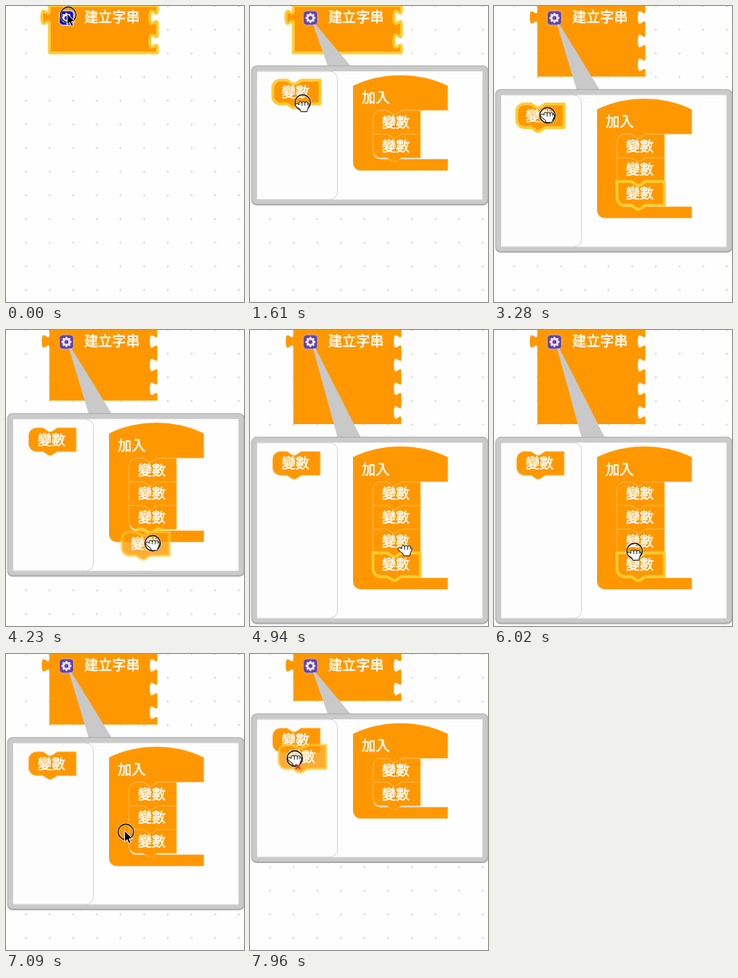
These frames come from a looping animation (298 px wide and 371 px high, 8 s). An HTML page with a canvas:

```html
<!DOCTYPE html>
<html lang="zh-Hant">
<head>
<meta charset="utf-8">
<style>
  html, body { margin: 0; width: 100%; height: 100%; overflow: hidden; background: #fefefe; }
  canvas { display: block; }
</style>
</head>
<body>
<canvas id="stage" width="298" height="371"></canvas>
<script>
const ctx = document.getElementById('stage').getContext('2d');
const LOOP = 8000, OPEN = 500, STEP = 88;
const S = 1.187;          // block units to pixels
const ROW = 25 * S;
const ORANGE = '#ff9800', EDGE = '#ffb74d', YELLOW = '#ffcc33';
const PALETTE_X = 28.5, STACK_X = 154;

// Each action: travel to a block, press, drag it, drop it.
// Adding drags a block out of the palette, otherwise the last one is removed.
const START = { x: 78, y: 11 };
const ACTIONS = [
  { add: true, leave: 1000, arrive: 1350, press: 1610, lift: 1700, drop: 2410,
    at: { x: 66, y: 121 }, to: { x: 183.5, y: 215 }, sway: 40 },
  { add: true, leave: 2500, arrive: 3190, press: 3190, lift: 3460, drop: 4320,
    at: { x: 67, y: 137 }, to: { x: 187, y: 271 }, sway: 0 },
  { add: false, leave: 4850, arrive: 5930, press: 6020, lift: 6110, drop: 6550,
    at: { x: 176, y: 277 }, to: { x: 48, y: 165 }, sway: 42 },
  { add: false, leave: 6730, arrive: 7090, press: 7090, lift: 7360, drop: LOOP,
    at: { x: 150, y: 223 }, to: { x: 56, y: 131 }, sway: 0 }
];

// Eased progress that advances in whole steps
function progress(t, from, to) {
  if (t < from) return 0;
  const steps = Math.round((to - from) / STEP) + 1;
  const u = Math.min(1, (Math.floor((t - from) / STEP + 0.05) + 1) / steps);
  return u * u * (3 - 2 * u);
}

const mix = (a, b, u) => ({ x: a.x + (b.x - a.x) * u, y: a.y + (b.y - a.y) * u });

function sceneAt(t) {
  const index = ACTIONS.findLastIndex(a => t >= a.leave);
  const action = ACTIONS[index];
  const upcoming = ACTIONS.find(a => t < a.drop);
  const finished = ACTIONS.findLast(a => t >= a.drop);

  let n = 2;
  for (const a of ACTIONS) {
    if (t >= (a.add ? a.drop : a.lift)) n += a.add ? 1 : -1;
  }
  const shift = ROW * (n - 2);
  const scene = {
    n, shift, pointer: START, pressed: t < OPEN,
    top: 75 + shift, stackY: 131 + shift, paletteY: 93 + shift,
    lastSelected: Boolean(finished?.add && t < upcoming.lift)
  };
  if (!action) return scene;

  const { add, at, to, press, lift, drop } = action;
  const from = index ? ACTIONS[index - 1].to : START;
  const travel = progress(t, action.leave, action.arrive);
  const p = mix(mix(from, at, travel), to, progress(t, lift, drop - STEP));
  p.x += action.sway * Math.sin(Math.PI * travel);

  scene.pointer = p;
  scene.pressed = t >= press && t < drop + STEP;
  scene.fist = scene.pressed && t >= press + STEP;
  scene.discard = scene.fist && !add && p.x < 110;
  scene.paletteSelected = add && t >= press && t < lift;
  scene.joining = add && t >= drop - 2 * STEP && t < drop;
  if (t >= lift && t < drop) {
    scene.dragged = add
      ? { x: p.x + PALETTE_X - at.x, y: p.y + scene.paletteY - at.y }
      : { x: p.x - 20, y: p.y - 17 };
  }
  return scene;
}

function label(text, x, middle) {
  ctx.font = '17.4px "Noto Sans CJK TC", "Noto Sans CJK", sans-serif';
  ctx.fillStyle = ctx.strokeStyle = '#fff';
  ctx.lineWidth = 0.45;
  ctx.fillText(text, x, middle + 6.4);
  ctx.strokeText(text, x, middle + 6.4);
}

function shape(d, x, y, { fill, stroke, width = 1, scale = S, fillAlpha = 1, strokeAlpha = 1 }) {
  const path = new Path2D(d);
  ctx.save();
  ctx.translate(x, y);
  ctx.scale(scale, scale);
  ctx.lineJoin = 'round';
  if (fill) {
    ctx.globalAlpha = fillAlpha;
    ctx.fillStyle = fill;
    ctx.fill(path);
  }
  if (stroke) {
    ctx.globalAlpha = strokeAlpha;
    ctx.strokeStyle = stroke;
    ctx.lineWidth = width;
    ctx.stroke(path);
  }
  ctx.restore();
}

function disc(x, y, r, color) {
  ctx.fillStyle = color;
  ctx.beginPath();
  ctx.arc(x, y, r, 0, 7);
  ctx.fill();
}

function grid() {
  ctx.fillStyle = '#fefefe';
  ctx.fillRect(0, 0, 298, 371);
  ctx.fillStyle = '#d9d9d9';
  for (let y = 0; y < 371; y += 29.67) {
    for (let x = 25; x < 298; x += 29.6) {
      ctx.fillRect(x - 1.5, y - 0.5, 3, 1);
      ctx.fillRect(x - 0.5, y - 1.5, 1, 3);
    }
  }
}

function gear(hover) {
  const x = 75.7, y = 15;
  const back = hover ? '#0808dc' : '#6346a4', ink = hover ? '#fff' : '#f1e3ec';
  ctx.beginPath();
  ctx.roundRect(x - 9, y - 9, 18, 18, 4.5);
  ctx.fillStyle = back;
  ctx.fill();
  ctx.strokeStyle = hover ? '#fff' : '#cfb0c0';
  ctx.lineWidth = 1;
  ctx.stroke();
  for (let a = 0; a < 2 * Math.PI; a += Math.PI / 4) {
    disc(x + 5 * Math.cos(a), y + 5 * Math.sin(a), 1.4, ink);
  }
  disc(x, y, 5, ink);
  disc(x, y, 2.5, back);
}

function mainBlock(n, selected, hover) {
  let d = 'M 0,0 H 114';
  for (let i = 0; i < n; i++) d += `V ${25 * i + 5} c 0,10 -8,-8 -8,7.5 s 8,-2.5 8,7.5`;
  d += `V ${25 * n} H 0 V 20 c 0,-10 -8,8 -8,-7.5 s 8,2.5 8,-7.5 Z`;
  shape(d, 54.3, -0.6, { fill: ORANGE, stroke: selected && YELLOW, width: 3 });
  gear(hover);
  label('建立字串', 98, 14);
}

function itemBlock(x, y, { selected = false, dragged = false, roundTop = true, roundBottom = true } = {}) {
  const d = (roundTop ? 'M 0,8 A 8,8 0 0,1 8,0' : 'M 0,0') +
    'H 15 l 6,4 3,0 6,-4 H 50 V 25 H 30 l -6,4 -3,0 -6,-4' +
    (roundBottom ? 'H 8 a 8,8 0 0,1 -8,-8' : 'H 0') + 'Z';
  shape(d, x, y, {
    fill: ORANGE, fillAlpha: dragged ? 0.8 : 1,
    stroke: selected ? YELLOW : EDGE, width: selected ? 3 : 0.7, strokeAlpha: dragged ? 0.6 : 1
  });
  label('變數', x + 11.2, y + 14.5);
}

function bubble(top, bottom) {
  const lean = 6 * (top - 75) / ROW;
  ctx.fillStyle = '#c9c9c9';
  ctx.beginPath();
  ctx.moveTo(79, 23);
  ctx.lineTo(98 + lean, top + 2);
  ctx.lineTo(127.5 + lean, top + 2);
  ctx.lineTo(82, 23);
  ctx.fill();

  const box = (inset, radius, color, lift = 0) => {
    ctx.fillStyle = color;
    ctx.beginPath();
    ctx.roundRect(2 + inset, top + inset, 296 - 2 * inset, bottom - top - 2 * inset - lift, radius);
    ctx.fill();
  };
  box(-0.5, 7, '#acacac');
  box(0.5, 6, '#cacaca', 1);
  box(6, 2, '#d0d0d0');
  box(7, 1, '#fefefe');

  const a = top + 7, b = bottom - 7;
  ctx.beginPath();
  ctx.moveTo(9, a);
  ctx.lineTo(100, a);
  ctx.arcTo(109.5, a, 109.5, a + 10, 9.5);
  ctx.lineTo(109.5, b - 9.5);
  ctx.arcTo(109.5, b, 100, b, 9.5);
  ctx.lineTo(9, b);
  ctx.fillStyle = '#fdfdfd';
  ctx.fill();
  ctx.strokeStyle = '#d6d6d6';
  ctx.lineWidth = 1;
  ctx.stroke();
}

function container(y, n) {
  const arm = 26 + 25 * n + 1.6;
  shape(`M 0,0 c 30,-15 70,-15 100,0 V 26 H 51 l -6,4 -3,0 -6,-4 H 29 a 8,8 0 0,0 -8,8
    V ${arm - 8} a 8,8 0 0,0 8,8 H 100 V ${arm + 12} H 8 a 8,8 0 0,1 -8,-8 Z`,
    129, y, { fill: ORANGE });
  label('加入', 140, y + 15);
}

function editor(scene, slack) {
  const { n, shift, top, stackY, dragged } = scene;
  bubble(top, 249.5 + 2 * shift + slack);
  container(100 + shift, n);
  for (let i = 0; i < n; i++) {
    const last = i === n - 1;
    itemBlock(STACK_X, stackY + i * ROW, {
      selected: last && scene.lastSelected, roundTop: i === 0, roundBottom: last
    });
  }
  if (scene.joining) {
    shape('M 8,0 H 15 l 6,4 3,0 6,-4 H 35', STACK_X, stackY + n * ROW, { stroke: YELLOW, width: 3.5 });
  }
  itemBlock(PALETTE_X, scene.paletteY, { selected: scene.paletteSelected });
  if (dragged) itemBlock(dragged.x, dragged.y, { selected: true, dragged: true });
}

function hand(x, y, rise) {
  shape(`M -8,1 C -10,-3 -6,-4 -4,-1 v ${-rise} q 0,-2 2,-2 t 2,2 q 0,-2 2,-2 t 2,2
    q 0,-1.6 2,-1.6 t 1.7,2 q 2.6,0 1.8,3 l -1.8,4 l -1,4 h -8 l -1,-3 Z`,
    x, y, { fill: '#fff', stroke: '#111', scale: 0.95 });
  shape(`M 0,${-1 - rise} v 3.5 M 4,${-1 - rise} v 3.5 M 7.4,-3 v 2.5`, x, y,
    { stroke: '#111', width: 0.9, scale: 0.95 });
}

function isOverBlock({ x, y }, { n, stackY, paletteY }) {
  const inside = (left, top, height) =>
    x >= left && x <= left + 50 * S && y >= top && y <= top + height;
  return inside(STACK_X, stackY, n * ROW) || inside(PALETTE_X, paletteY, ROW);
}

function cursor(scene, open) {
  const { x, y } = scene.pointer;
  if (scene.pressed) {
    ctx.beginPath();
    ctx.arc(x, y, 9.7, 0, 7);
    ctx.strokeStyle = 'rgba(255,255,255,.6)';
    ctx.lineWidth = 2.6;
    ctx.stroke();
    ctx.strokeStyle = '#151515';
    ctx.lineWidth = 1.4;
    ctx.stroke();
  }
  if (scene.fist) {
    hand(x - 0.5, y + 1, 2);
    if (scene.discard) {
      shape('M 0,0 l 6,6 m 0,-6 l -6,6', x + 1, y + 7, { stroke: '#e33022', width: 1.8, scale: 1 });
    }
  } else if (open && isOverBlock(scene.pointer, scene)) {
    hand(x - 1, y + 4, 2.5);
  } else {
    shape('M 0,0 V 14 l 3.2,-3 2.2,5 2.4,-1.1 -2.2,-4.8 h 4.4 Z', x - 1.5, y - 1.5,
      { fill: '#000', stroke: '#fff', width: 0.9, scale: 1 });
  }
}

function draw(t) {
  const scene = sceneAt(t);
  const open = t >= OPEN;
  // Removing a block leaves the bubble a little taller
  const slack = ACTIONS.some(a => !a.add && t >= a.lift) ? 12 : 0;
  grid();
  mainBlock(scene.n, t < ACTIONS[0].lift, t < ACTIONS[0].leave);
  if (open) editor(scene, slack);
  cursor(scene, open);
}

const begin = performance.now();
function tick() {
  draw((performance.now() - begin) % LOOP);
  requestAnimationFrame(tick);
}
tick();
</script>
</body>
</html>
```
